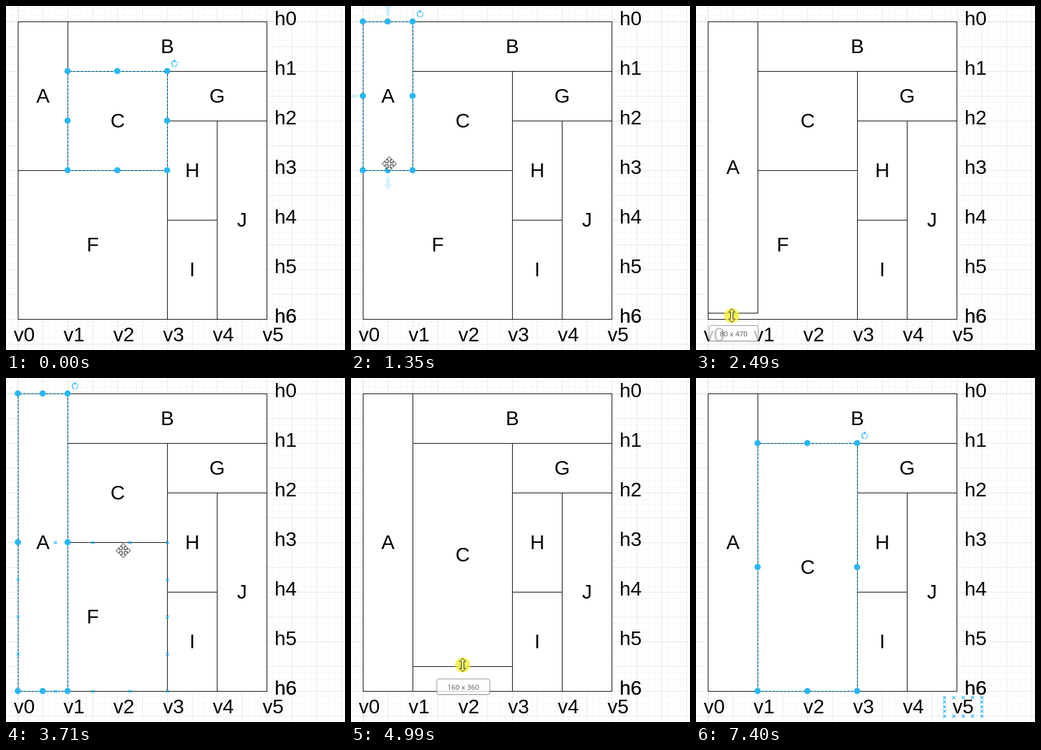
An HTML page that plays this animation: 545x555 px, repeating every 7540 ms.

```html
<!DOCTYPE html>
<html lang="en">
<head>
<meta charset="utf-8">
<title>Floor plan resize</title>
<style>
  html, body { margin: 0; width: 100%; height: 100%; overflow: hidden; background: #fff; }
  svg { display: block; }
  text { text-anchor: middle; font: 32px "Liberation Sans", Arial, sans-serif; }
  .size { font: 11.4px "Open Sans", "Noto Sans", sans-serif; fill: #555; }
</style>
</head>
<body>
<svg width="545" height="555" viewBox="0 0 545 555">
  <defs>
    <pattern id="grid" x="19" y="25" width="40" height="40" patternUnits="userSpaceOnUse">
      <path d="M10.5 0V40M20.5 0V40M30.5 0V40M0 10.5H40M0 20.5H40M0 30.5H40" stroke="#f7f7f7"/>
      <path d="M0.5 40V0.5H40" fill="none" stroke="#e7e7e7"/>
    </pattern>
  </defs>
  <rect width="545" height="555" fill="url(#grid)"/>
  <path d="M0 25.5H545M19.5 0V555" stroke="#ccc" stroke-dasharray="3 3"/>
  <g id="scene" transform="translate(.5 .5)"></g>
</svg>
<script>
const LOOP = 7540, STEPS = 112;
const UNIT = 80, LEFT = 19, TOP = 25;
const BLUE = '#29b6f2';
const scene = document.getElementById('scene');

// Rooms are given in grid units, captions in pixels.
const room = (name, col, row, w, h) => ({
  name, x: LEFT + col * UNIT, y: TOP + row * UNIT, w: w * UNIT, h: h * UNIT
});
const caption = (name, x, y) => ({ name, x, y, w: 60, h: 30, plain: true });

const A = room('A', 0, 0, 1, 3);
const C = room('C', 1, 1, 2, 2);
const shapes = [
  room('F', 0, 3, 3, 3), room('B', 1, 0, 4, 1), room('G', 3, 1, 2, 1),
  room('H', 3, 2, 1, 2), room('I', 3, 4, 1, 2), room('J', 4, 2, 1, 4), A, C
];
for (let i = 0; i <= 6; i++) shapes.push(caption('h' + i, 419, 5 + UNIT * i));
for (let i = 0; i <= 5; i++) shapes.push(caption('v' + i, UNIT * i - 1, 515));
shapes.push(caption('h6', 419, 485)); // doubled caption, hence bolder

// Moments of the story, in steps
const PICK_A = 17, DRAG_A = 24, DROP_A = 52, PICK_C = 62, DRAG_C = 69, DROP_C = 86, LEAVE = 89;

const smooth = k => k * k * (3 - 2 * k);
const slowDown = k => 1 - (1 - k) ** 1.8;

// Pointer stops: step, x, y, easing on the way there
const stops = [
  [1, 468, 506], [8, 150, 240], [10, 150, 240], [15, 61, 254], [20, 61, 254],
  [DRAG_A, 57, 265], [40, 57, 511, slowDown], [47, 57, 511], [49, 57, 506], [DROP_A, 57, 506],
  [55, 188, 278], [58, 188, 278], [PICK_C, 179, 250], [66, 179, 265], [69.3, 179, 265],
  [75, 179, 480], [82, 179, 505], [DROP_C, 179, 505], [88, 430, 540]
];

function pointerAt(step) {
  const i = stops.findIndex(s => s[0] > step);
  if (i <= 0) return stops.at(i).slice(1, 3);
  const [t0, x0, y0] = stops[i - 1], [t1, x1, y1, ease = smooth] = stops[i];
  const k = ease((step - t0) / (t1 - t0));
  return [x0 + (x1 - x0) * k, y0 + (y1 - y0) * k];
}

const within = (n, from, to) => n >= from && n < to;
const place = (x, y, inner) => `<g transform="translate(${x} ${y})">${inner}</g>`;
const outline = (s, style) => `<rect x="${s.x}" y="${s.y}" width="${s.w}" height="${s.h}" ${style}/>`;

const drawShape = s => (s.plain ? '' : outline(s, 'fill="#fff" stroke="#000"'))
  + `<text x="${s.x + s.w / 2}" y="${s.y + s.h / 2 + 10.5}">${s.name}</text>`;

// Visits points on the border of a box, with n intervals per side.
function borderPoints(s, n, draw) {
  let out = '';
  for (let i = 0; i <= n; i++)
    for (let j = 0; j <= n; j++)
      if (i % n === 0 || j % n === 0) out += draw(s.x + s.w * i / n, s.y + s.h * j / n);
  return out;
}

const drawHandle = (x, y) => `<circle cx="${x - .5}" cy="${y - .5}" r="5" fill="${BLUE}"/>`;
const drawCrosses = s => `<path stroke="${BLUE}" stroke-width="1.2" stroke-linecap="square" d="${
  borderPoints(s, 4, (x, y) => `M${x - 2} ${Math.floor(y) - 2}l4 4m0-4l-4 4`)}"/>`;

const rotateIcon = `<g fill="none" stroke="${BLUE}" stroke-width="1.4">
  <path d="M-.7 -4.6A4.7 4.7 0 0 0 -.7 4.6"/>
  <path d="M.7 4.6A4.7 4.7 0 0 0 3.7 -2.9" stroke-dasharray="2.4 1.3"/>
  <path d="M-.7 -7.3L2.4 -4.3L-.7 -1.3Z" fill="${BLUE}" stroke="none"/></g>`;

const drawSelection = s =>
  outline(s, 'fill="none" stroke="#00a8ff" stroke-dasharray="3 3"')
  + borderPoints(s, 2, drawHandle)
  + place(s.x + s.w + 11.5, s.y - 12.5, rotateIcon);

function drawArrows(s) {
  const arrow = (x, y, turn) => `<path transform="translate(${x} ${y}) rotate(${turn})"
    d="M-3 10H3V22H7L0 31L-7 22H-3Z" fill="${BLUE}" opacity=".18"/>`;
  const cx = s.x + s.w / 2;
  return arrow(cx, s.y, 180) + arrow(cx, s.y + s.h, 0) + arrow(s.x, s.y + s.h / 2, 90);
}

function drawSize(s) {
  const text = `${s.w} x ${s.h}`, w = 6 * text.length + 31;
  const cx = s.x + s.w / 2 + 1, tag = { x: cx - w / 2, y: s.y + s.h + 20, w, h: 25 };
  return place(1, 1, outline(tag, 'rx="3" fill="none" stroke="#000" opacity=".12"'))
    + outline(tag, 'rx="3" fill="#fff" fill-opacity=".75" stroke="#999"')
    + `<text class="size" x="${cx}" y="${tag.y + 17}">${text}</text>`;
}

const moveCursor = [0, 90, 180, 270].map(turn => `<path transform="rotate(${turn})"
  d="M-1.5 -1.5V-6.5H-5L0 -11.5L5 -6.5H1.5V-1.5" fill="#fff" stroke="#111"/>`).join('')
  + '<rect x="-1.5" y="-1.5" width="3" height="3" fill="#fff"/>';
const sizeCursor = fill =>
  `<path d="M0 -11L5 -5.5H2V5.5H5L0 11L-5 5.5H-2V-5.5H-5Z" fill="${fill}" stroke="#333"/>`;
const pressCursor = '<circle r="12" fill="#f6f032" opacity=".8"/>' + sizeCursor('#f4f07a');

function render(ms) {
  const n = Math.floor((ms + 6) / (LOOP / STEPS)) % STEPS;
  const [px, py] = pointerAt(n);
  const dragged = within(n, DRAG_A, DROP_A) ? A : within(n, DRAG_C, DROP_C) ? C : null;
  const selected = dragged ? null : within(n, PICK_A, PICK_C) ? A : C;

  const snap = s => Math.round((py - s.y) / 10) * 10;
  A.h = dragged === A ? snap(A) : UNIT * (n < DRAG_A ? 3 : 6);
  C.h = dragged === C ? snap(C) : UNIT * (n < DRAG_C ? 2 : 5);

  const hit = s => px >= s.x && px <= s.x + s.w && py >= s.y && py <= s.y + s.h;
  const hovered = n > 0 && !dragged ? shapes.filter(hit).pop() : null;

  let out = shapes.map(drawShape).join('');
  if (selected) out += drawSelection(selected);
  if (hovered && hovered !== selected) out += drawCrosses(hovered);
  if (within(n, PICK_A + 1, DRAG_A) || n === DROP_A + 1) out += drawArrows(A);
  if (dragged) {
    out += drawSize(dragged) + drawHandle(dragged.x + dragged.w / 2, dragged.y + dragged.h)
      + place(px, py, pressCursor);
  } else if (within(n, 1, LEAVE)) {
    const onHandle = within(n, DRAG_A - 2, DRAG_A) || within(n, DRAG_C - 3, DRAG_C);
    out += place(px, py, onHandle ? sizeCursor('#fff') : moveCursor);
  }
  scene.innerHTML = out;
}

const start = performance.now();
function tick() {
  render((performance.now() - start) % LOOP);
  requestAnimationFrame(tick);
}
tick();
</script>
</body>
</html>
```
